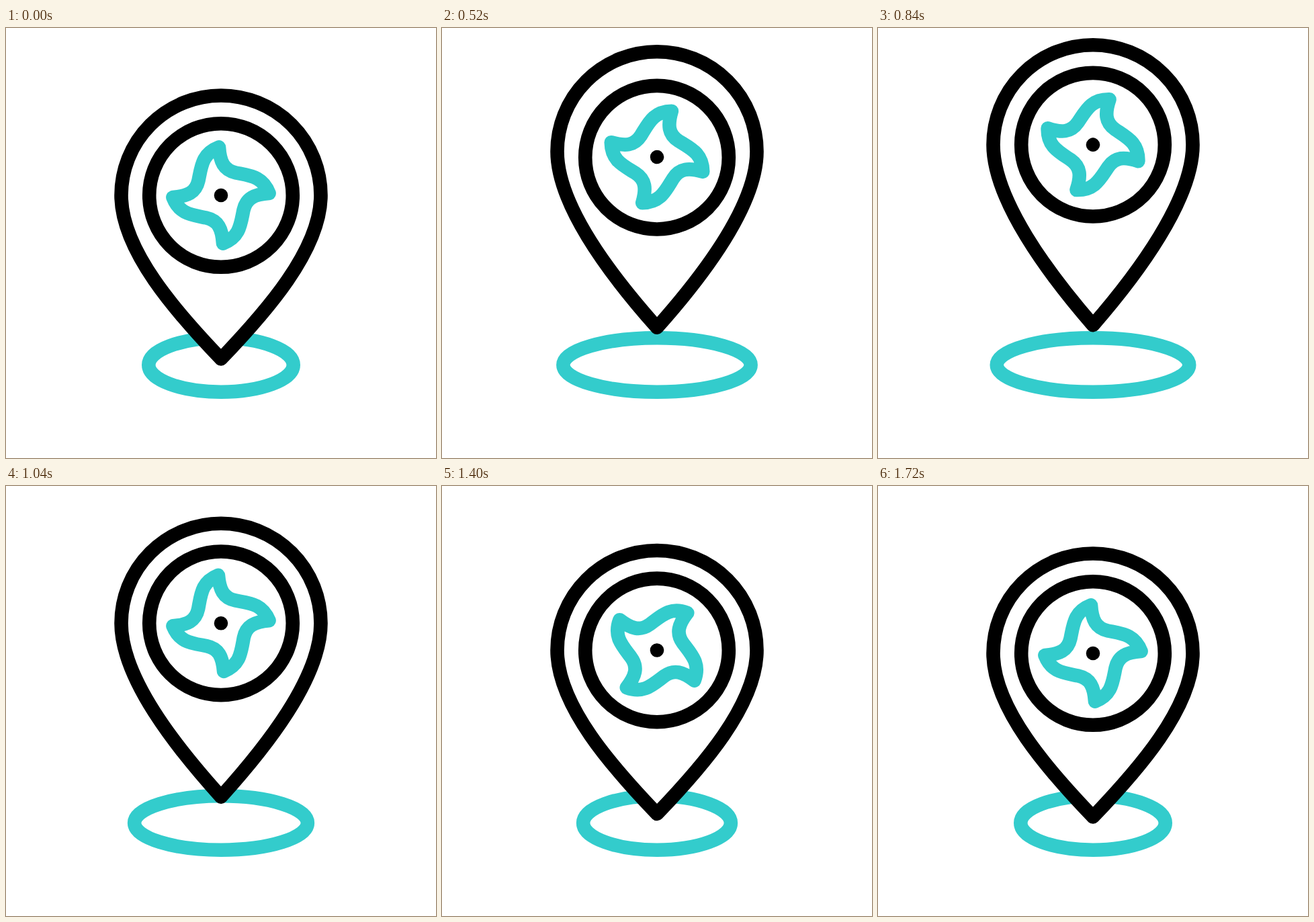
An HTML page that plays this animation: 640 by 640 pixels, repeating every 2000 ms.

```html
<!DOCTYPE html>
<html lang="en">
<head>
<meta charset="utf-8">
<title>Map pin</title>
<style>
  html, body { margin: 0; width: 100%; height: 100%; overflow: hidden; background: #fff; }
  svg { display: block; width: 100%; height: 100%; }
</style>
</head>
<body>
<svg viewBox="0 0 640 640" fill="none" stroke="#000" stroke-width="20.6" stroke-linejoin="round">
  <ellipse id="ring" cx="320" cy="501.5" ry="40.2" stroke="#33cccc"/>
  <path id="pin" fill="#fff"/>
  <circle id="dial" cx="320" r="106.8"/>
  <g id="needle">
    <path id="star" stroke="#33cccc"/>
    <circle r="10.3" fill="#000" stroke="none"/>
  </g>
</svg>
<script>
const LOOP = 2000, STEP = 40;
const JUMP = 200, RISE = 500;              // start and length of the jump
const DROP = 864, FALL = 277, SPIN = 850;  // start of the drop, first fall, turning time
const LIFT = 75, STRETCH = 25, TURN = 22.4;
const $ = id => document.getElementById(id);
const clamp = x => Math.min(1, Math.max(0, x));

// Steep ease in and out
function ease(u) {
  const a = u ** 3.8, b = (1 - u) ** 3.8;
  return a / (a + b);
}

// Soft hump from 0 to 1 and back between two times
const hump = (t, from, to) => Math.sin(Math.PI * clamp((t - from) / (to - from))) ** 2;

// Height left while dropping: each bounce is half as long as the last
function bounce(x) {
  for (let mid = 0, half = 1; half > 0.1; mid += 1.5 * half, half /= 2) {
    if (Math.abs(x - mid) < half) return half ** 2 - (x - mid) ** 2;
  }
  return 0;
}

// The tip leaves the ground first, the body dips, the dial lags behind
function rising(t) {
  const e = ease(clamp((t - JUMP) / RISE));
  const over = 0.045 * hump(t, 620, DROP);
  const lag = hump(t, JUMP, 700);
  return {
    body: LIFT * (e + over - 0.127 * hump(t, JUMP, 580)),
    dial: LIFT * (e + over - 0.18 * lag),
    star: LIFT * (e + over - 0.17 * lag),
    tip: (LIFT - STRETCH) * (e + over + 0.31 * hump(t, JUMP, 560)),
    spread: e,
    angle: TURN * e
  };
}

function dropping(t) {
  const x = (t - DROP) / FALL, left = bounce(x), h = LIFT * left;
  return {
    body: h, dial: h, star: h,
    tip: h - (x < 1 ? STRETCH * left : 0),
    spread: left,
    angle: TURN - (90 + TURN) * clamp((t - DROP) / SPIN)
  };
}

function pinPath(cy, tip) {
  const y1 = cy + 82, y2 = cy + 0.717 * (tip - cy);
  return `M171.5 ${cy}A148.5 148.5 0 0 1 468.5 ${cy}` +
    `C468.5 ${y1} 386 ${y2} 320 ${tip}C254 ${y2} 171.5 ${y1} 171.5 ${cy}Z`;
}

// One arm, repeated by quarter turns
function starPath() {
  let d = 'M-3 -71.6';
  let arm = [[-1.5, -50], [4, -37.5], [22, -33.5], [44, -29], [62, -28], [71.6, -3]];
  for (let i = 0; i < 4; i++) {
    d += 'C' + arm.join(' ');
    arm = arm.map(([x, y]) => [-y, x]);
  }
  return d + 'Z';
}

function draw(ms) {
  const t = Math.floor((ms % LOOP) / STEP) * STEP;
  const p = t < DROP ? rising(t) : dropping(t);
  $('ring').setAttribute('rx', 107.7 + 35.5 * p.spread);
  $('pin').setAttribute('d', pinPath(249 - p.body, 492.5 - p.tip));
  $('dial').setAttribute('cy', 249 - p.dial);
  $('needle').setAttribute('transform', `translate(320 ${249 - p.star}) rotate(${p.angle})`);
}

$('star').setAttribute('d', starPath());
const start = performance.now();
function tick() {
  draw(Math.max(0, performance.now() - start));
  requestAnimationFrame(tick);
}
tick();
</script>
</body>
</html>
```
